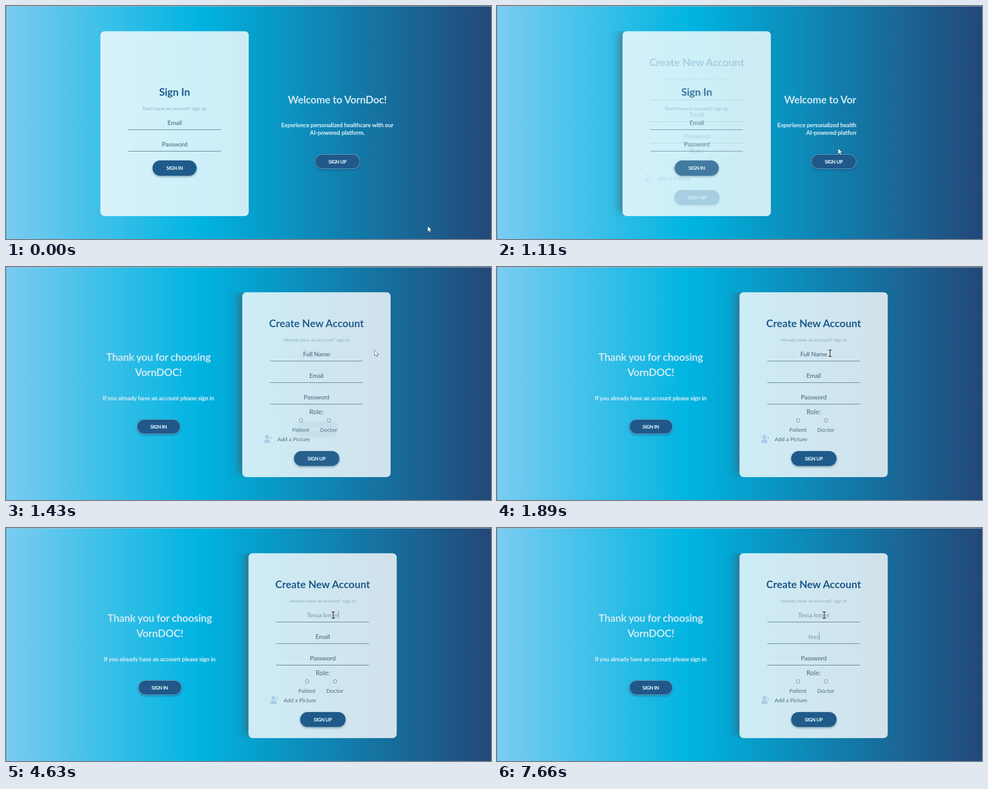
Animation, 1079 px wide and 519 px high, one loop 8000 ms. Source, as an HTML page:

```html
<!DOCTYPE html>
<html lang="en">
<head>
<meta charset="utf-8">
<title>Sign in / sign up slider</title>
<style>
  html, body { margin: 0; width: 100%; height: 100%; overflow: hidden; }
  body {
    position: relative; font-family: Lato, sans-serif;
    background: linear-gradient(90deg, #7accf1, #00b4e1 40%, #234878);
  }
  body::before { content: ""; position: absolute; inset: 0; border: solid #bdbbb9; border-width: 1px 0 0; }
  body::after { content: ""; position: absolute; inset: 1px auto 0 0; width: 1px; background: #5d9fc4; }
  div, svg { position: absolute; }
  .fill { inset: 0; }
  #box { clip-path: inset(56.3px 209.5px 51px 210px round 9px); }
  #card {
    left: 210.2px; top: 56.3px; width: 329.5px; height: 411.7px; border-radius: 9px;
    background: rgba(255, 255, 255, .8); box-shadow: -10px -4px 20px -4px rgba(82, 76, 82, .64);
  }
  .text { transform: translate(-50%, -50%); white-space: pre; line-height: 17px; min-height: 17px; }
  .title { font: bold 23px/28px Lato, sans-serif; color: #1e5a8c; }
  .hint { font-size: 10.35px; color: #86adbf; }
  .label { font-size: 12.3px; color: #4a6a7d; }
  .role { font-size: 14.6px; color: #4a6a7d; }
  .holder { font-size: 14px; font-weight: 500; letter-spacing: -.25px; color: #4a6e82; }
  .typed { font-size: 13.9px; font-weight: 600; letter-spacing: -.15px; color: #86a3b6; }
  .caret::after { content: ""; position: absolute; left: 100%; top: 0; width: 1px; height: 17px; background: #5b7d92; }
  .line { width: 206px; height: 1px; background: #4c6b7b; }
  .radio { width: 7px; height: 7px; border: 1px solid #6f818c; border-radius: 50%; }
  .head { font: bold 23px/28px Lato, sans-serif; letter-spacing: -.28px; color: #cbe8f3; }
  .lead { font-size: 12.9px; font-weight: bold; letter-spacing: -.08px; color: #cbe8f3; }
  .lead, .button { -webkit-text-stroke: .2px; }
  .button {
    box-sizing: border-box; height: 33.5px; border-radius: 17px; background: #1f5b8a;
    box-shadow: 0 2px 4px rgba(20, 60, 95, .5); color: #d9f1f8; text-align: center;
    font: bold 10.8px/33.5px Lato, sans-serif; letter-spacing: -.4px;
  }
  .outlined { border: 1px solid rgba(150, 205, 228, .75); line-height: 31.5px; background: #20588a; }
  .hover { background: linear-gradient(90deg, #08b0d8, #26578a); }
</style>
</head>
<body>
<div id="box" class="fill">
  <div id="panels" class="fill">
    <div id="thanks" class="fill"></div>
    <div id="welcome" class="fill"></div>
  </div>
  <div id="slider" class="fill">
    <div id="card"></div>
    <div id="signIn" class="fill"></div>
    <div id="signUp" class="fill">
      <svg style="left:258px;top:373px" width="20" height="20" fill="#a9cde9">
        <circle cx="7.4" cy="5.4" r="4.3"/>
        <path d="M.7 19V16.500Q.7 11 6 11H9Q14.300 11 14.300 16.500V19ZM13 6.700H15V4.700H16.500V6.700H18.500V8.200H16.500V10.200H15V8.200H13Z"/>
      </svg>
    </div>
  </div>
</div>
<svg class="fill" width="1079" height="519">
  <g id="arrow"><path d="M0 0V13L3 10.300L5 15L7.200 14L5.200 9.500H9.200Z" fill="#fff" stroke="#24425c" stroke-width=".8"/></g>
  <g id="hand"><path d="M-1.500 1Q0 -1 1.500 1V6Q3 5 4 6.500Q5.500 5.800 6 7.300Q8 7 8 9V13Q7.500 15 6 17.500H-1.500Q-3 14 -5 10.500Q-4.500 8.500 -2.500 10L-1.500 11Z" fill="#fff" stroke="#24425c" stroke-width=".8"/></g>
  <g id="beam" fill="none"><path d="M-3.500 -7H3.500M-3.500 7H3.500M0 -7V7" stroke="#fff" stroke-width="3"/><path d="M-3.500 -7H3.500M-3.500 7H3.500M0 -7V7" stroke="#111" stroke-width="1.400"/></g>
</svg>
<script>
const $ = id => document.getElementById(id);
const LOOP = 8000, TRAVEL = 329.5, CENTER = 375;

function add(parent, cls, x, y, text = "") {
  const el = document.createElement("div");
  el.className = cls;
  el.style.left = x + "px";
  el.style.top = y + "px";
  el.textContent = text;
  $(parent).append(el);
  return el;
}
const write = (parent, cls, x, y, text) => add(parent, "text " + cls, x, y, text);
function button(parent, cls, x, y, width, text) {
  const el = add(parent, "button " + cls, x, y, text);
  el.style.width = width + "px";
  return el;
}
function field(parent, y, name) {
  add(parent, "line", CENTER - 103, y + 16);
  return {
    holder: write(parent, "holder", CENTER, y, name),
    value: write(parent, "typed", CENTER, y)
  };
}

write("signIn", "title", CENTER, 190.5, "Sign In");
write("signIn", "hint", CENTER, 228, "Don't have an account? sign up");
field("signIn", 259, "Email");
field("signIn", 307, "Password");
button("signIn", "", 326.3, 344, 97.5, "SIGN IN");

write("signUp", "title", CENTER, 125, "Create New Account");
write("signUp", "hint", CENTER, 162, "Already have an account? sign in");
const nameField = field("signUp", 193, "Full Name");
const mailField = field("signUp", 241, "Email");
field("signUp", 289, "Password");
write("signUp", "role", CENTER, 321.5, "Role:");
[["Patient", 340], ["Doctor", 402]].forEach(([role, x]) => {
  add("signUp", "radio", x - 4.5, 337.3);
  write("signUp", "label", x, 362, role);
});
write("signUp", "label", 324.6, 383, "Add a Picture");
button("signUp", "", 324.6, 409.5, 101, "SIGN UP");

write("welcome", "head", 737, 208, "Welcome to VornDoc!");
write("welcome", "lead", 737, 265, "Experience personalized healthcare with our");
write("welcome", "lead", 737, 282, "AI-powered platform.");
const joinButton = button("welcome", "outlined", 687, 329.5, 101, "SIGN UP");

write("thanks", "head", 342, 199.5, "Thank you for choosing");
write("thanks", "head", 342, 234, "VornDOC!");
write("thanks", "lead", 342, 291.5, "If you already have an account please sign in");
button("thanks", "outlined", 293.7, 338.5, 97, "SIGN IN");

// cubic-bezier(.42, 0, .58, 1)
function easeInOut(x) {
  if (x <= 0) return 0;
  if (x >= 1) return 1;
  let lo = 0, hi = 1, u;
  for (let i = 0; i < 24; i++) {
    u = (lo + hi) / 2;
    const v = 1 - u;
    if (1.26 * u * v * v + 1.74 * u * u * v + u ** 3 < x) lo = u; else hi = u;
  }
  return 3 * u * u - 2 * u ** 3;
}
const slide = (t, from, duration) => easeInOut((t - from) / duration);

// time, x, y
const PATH = [
  [70, 938, 490], [570, 735, 358], [740, 735, 358], [860, 743, 346], [1000, 743, 346],
  [1230, 776, 286], [1430, 820, 185], [1560, 814, 182], [1950, 728, 194]
];
function pointer(t) {
  const i = PATH.findIndex(p => p[0] > t);
  if (i === 0) return PATH[0].slice(1);
  if (i < 0) return PATH[PATH.length - 1].slice(1);
  const [t0, x0, y0] = PATH[i - 1], [t1, x1, y1] = PATH[i];
  const k = (t - t0) / (t1 - t0);
  return [x0 + (x1 - x0) * k, y0 + (y1 - y0) * k];
}

const NAME = "Tessa lomer", MAIL = "tessa", ERASE = 7310;
const NAME_KEYS = [2760, 3150, 3290, 3360, 3620, 3880, 4080, 4210, 4360, 4430, 4630];
const MAIL_KEYS = [5550, 5750, 5950, 6180, 6580];
const typed = (keys, t) => keys.filter(k => k <= t).length;
const within = (t, ...spans) => spans.some(([a, b]) => t >= a && t < b);

function show({ holder, value }, text, caret) {
  value.textContent = text;
  value.classList.toggle("caret", caret);
  holder.style.visibility = text ? "hidden" : "visible";
}
const shift = (id, x) => $(id).style.transform = `translateX(${x}px)`;

function draw(t) {
  const card = slide(t, 922, 595), panel = slide(t, 945, 570), view = slide(t, 872, 600);
  shift("slider", TRAVEL * card);
  $("signIn").style.opacity = 1 - card;
  $("signUp").style.opacity = card;

  // the left edge of the window runs slightly ahead of its right edge
  const left = 540 - TRAVEL * view, right = 210 + TRAVEL * card;
  $("panels").style.clipPath = `inset(0 ${right}px 0 ${left}px)`;
  shift("thanks", -.2 * TRAVEL * (1 - panel));
  shift("welcome", .2 * TRAVEL * panel);
  joinButton.classList.toggle("hover", within(t, [760, 1060]));

  show(nameField, NAME.slice(0, typed(NAME_KEYS, t)), within(t, [1900, 2430], [2760, 4890]));
  show(mailField, MAIL.slice(0, typed(MAIL_KEYS, t) - (t >= ERASE)),
    within(t, [4890, 5420], [5550, 7110], [7660, LOOP]));

  const [x, y] = pointer(t);
  const shape = within(t, [540, 1060]) ? "hand" : t > 1600 && x < 807 ? "beam" : "arrow";
  for (const id of ["arrow", "hand", "beam"]) {
    $(id).setAttribute("visibility", id === shape ? "visible" : "hidden");
    $(id).setAttribute("transform", `translate(${x} ${y})`);
  }
}

const start = performance.now();
function tick() {
  draw((performance.now() - start) % LOOP);
  requestAnimationFrame(tick);
}
tick();
</script>
</body>
</html>
```
